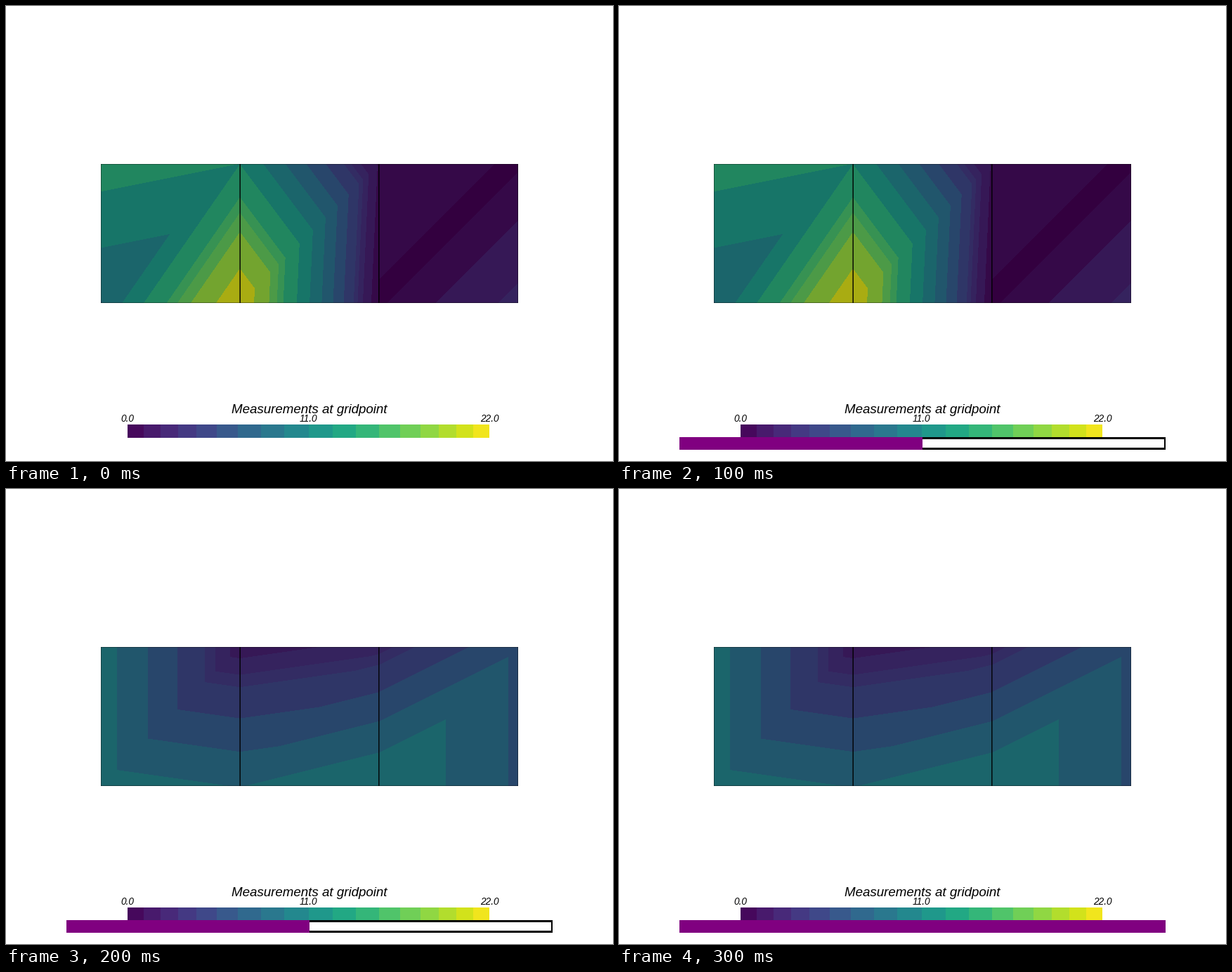
Recreate the animation shown at these times as a matplotlib script. Size 864x648 px, loop 400 ms.

```python
import numpy as np
import matplotlib.pyplot as plt
from matplotlib.animation import FuncAnimation
from matplotlib.patches import Rectangle

W, H, DPI = 864, 648, 100
PX = 72 / DPI
VMAX = 22
LIGHT = 0.76
X0, Y0, CELL = 135, 225, 198
X1, Y1 = X0 + 3 * CELL, Y0 + CELL

# Grid point values per step: top row, bottom row
STEPS = [
    ([14, 13, 1, 0], [9, 22, 0, 3]),
    ([10, 2, 3, 7], [10, 9, 11, 7]),
]

viridis = plt.get_cmap("viridis")


def contour_levels():
    """Steps that widen slowly, with three finer ones in between."""
    k = np.arange(12)
    steps = 1.17 * k + 0.057 * k ** 2
    return np.sort(np.r_[steps, 0.17, 3.4, 16.15, VMAX])


def bar_edges(left, right, n=18):
    """Bands that are widest in the middle of the bar."""
    t = np.linspace(0, 1, n + 1)
    return left + (right - left) * (t - 0.2 * np.sin(2 * np.pi * t) / (2 * np.pi))


def band_colors(edges):
    """Colour of the middle of each band."""
    mid = (edges[:-1] + edges[1:]) / 2
    return viridis((mid - edges[0]) / (edges[-1] - edges[0]))[:, :3]


def cell_values(tl, tr, bl, br):
    """Linear interpolation on two triangles split from bottom left to top right."""
    t = (np.arange(CELL) + 0.5) / CELL
    u, w = np.meshgrid(t, 1 - t)
    upper = bl + w * (tl - bl) + u * (tr - tl)
    lower = bl + u * (br - bl) + w * (tr - br)
    return np.where(w > u, upper, lower)


def mesh_image(top, bottom):
    levels = contour_levels()
    cells = [cell_values(top[i], top[i + 1], bottom[i], bottom[i + 1])
             for i in range(3)]
    band = np.digitize(np.hstack(cells), levels[1:-1])
    return band_colors(levels)[band] * LIGHT


fig = plt.figure(figsize=(W / DPI, H / DPI), dpi=DPI, facecolor="white")
ax = fig.add_axes([0, 0, 1, 1])
ax.axis("off")


def box(x0, y0, x1, y1, color, z):
    return ax.add_patch(Rectangle((x0, y0), x1 - x0, y1 - y0, fc=color,
                                  ec="none", lw=0, zorder=z))


def line(xs, ys, width, alpha):
    ax.plot(xs, ys, color="black", lw=width * PX, alpha=alpha, zorder=2,
            snap=False, solid_capstyle="butt")


def label(x, y, s, size):
    ax.text(x, y, s, fontsize=size * PX, family="Liberation Sans",
            style="italic", color="black", ha="center", va="baseline",
            zorder=8)


# Mesh with its cell edges
images = [mesh_image(*s) for s in STEPS]
mesh = ax.imshow(images[0], extent=(X0, X1, Y1, Y0),
                 interpolation="nearest", aspect="auto", zorder=1)
for x in (333.17, 530.83):
    line([x, x], [Y0, Y1], 1.4, 1)
for x in (X0 + 0.5, X1 - 0.5):
    line([x, x], [Y0, Y1], 1, 0.35)
for y in (Y0 + 0.5, Y1 - 0.5):
    line([X0, X1], [y, y], 1, 0.35)

# Scalar bar
edges = bar_edges(173, 688)
for a, b, c in zip(edges, edges[1:], band_colors(edges)):
    box(a, 596, b, 615, c, 3)
label(432, 580, "Measurements at gridpoint", 18.75)
for v in (0, VMAX / 2, VMAX):
    label(173 + 515 * v / VMAX, 592, f"{v:.1f}", 13.6)

# Progress bar
P0, P1, PT, PB = 86, 778, 614, 632
rim = box(P0, PT, P1, PB, "black", 4)
inner = box(P0 + 2, PT + 3, P1 - 2, PB - 3, "white", 5)
fill = box(P0, PT, P0, PB, "purple", 6)

ax.set_xlim(0, W)
ax.set_ylim(H, 0)


def update(n):
    mesh.set_data(images[n // 2])
    done = (n + 1) // 2 / 2
    for p in (rim, inner, fill):
        p.set_visible(done > 0)
    fill.set_width((P1 - P0) * done)
    return mesh, rim, inner, fill


anim = FuncAnimation(fig, update, frames=4, interval=100, repeat=True,
                     init_func=lambda: update(0), blit=False)
plt.show()
```
